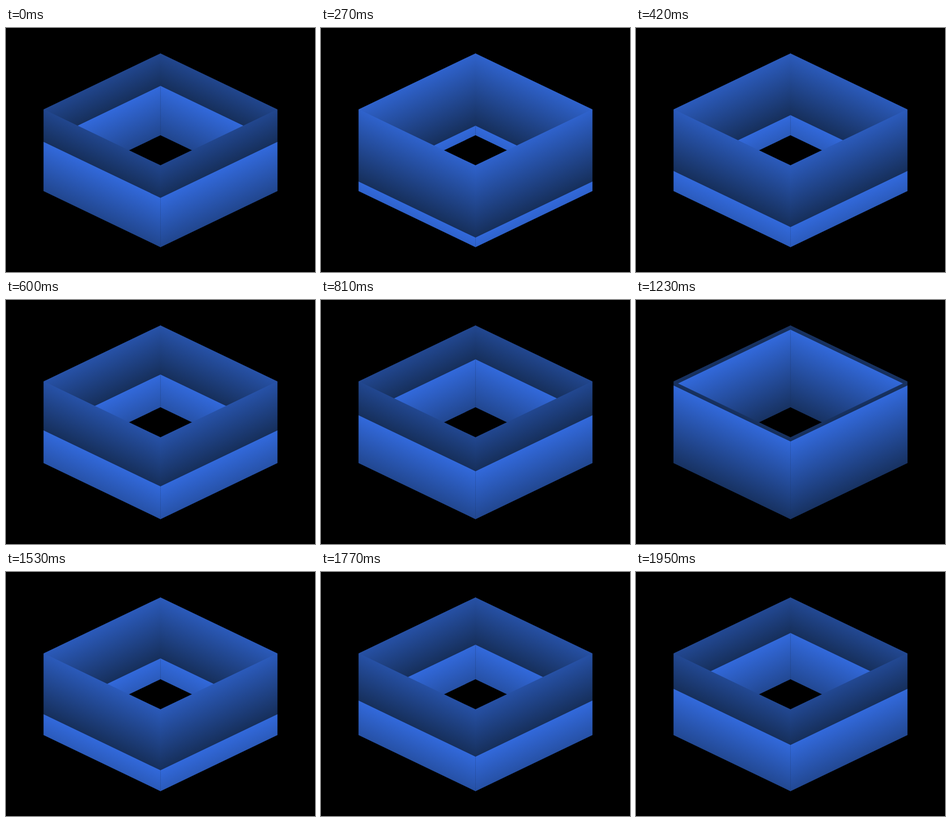
Animation, 545 px wide and 432 px high, one loop 1980 ms. Source, as an HTML page:

```html
<!DOCTYPE html>
<html lang="en">
<head>
<meta charset="utf-8">
<title>Isometric gradient box</title>
<style>
  html, body { margin: 0; width: 100%; height: 100%; overflow: hidden; background: #000; }
  svg { display: block; width: 545px; height: 432px; }
</style>
</head>
<body>
<svg viewBox="0 0 545 432">
  <defs>
    <linearGradient id="above" gradientUnits="userSpaceOnUse" x1="0" x2="0">
      <stop offset="0" stop-color="#3269db"/><stop offset="1" stop-color="#162f5b"/>
    </linearGradient>
    <linearGradient id="below" gradientUnits="userSpaceOnUse" x1="0" x2="0">
      <stop offset="0" stop-color="#3269db"/><stop offset="1" stop-color="#162f5b"/>
    </linearGradient>
  </defs>
  <g id="walls"></g>
</svg>
<script>
const LOOP = 1980, STEP = 30;
const HEIGHT = 144.8, WIDTH = 206, RISE = 99.1;
const LEFT = 66.5, MIDDLE = 272.5, TOP = 44.9;

// [time, position of the seam below the rim]; the seam wraps at the wall height
const KEYS = [
  [0, 57.7], [90, 57.7], [120, 1.5], [270, -16.8], [600, -57.8], [630, -62.4],
  [660, -62.4], [990, -111.3], [1020, -111.3], [1200, -130], [1230, -137.3],
  [1530, -181.6], [1560, -181.6], [1950, -226.5], [1980, -231.9]
];

const walls = document.getElementById("walls");
const above = document.getElementById("above");
const below = document.getElementById("below");
const lowerRects = [];

function set(el, attrs) {
  for (const name in attrs) el.setAttribute(name, attrs[name]);
  return el;
}

function addRect(parent, attrs) {
  const rect = document.createElementNS("http://www.w3.org/2000/svg", "rect");
  return parent.appendChild(set(rect, attrs));
}

function addWall(x, y, rise, overlap) {
  const group = document.createElementNS("http://www.w3.org/2000/svg", "g");
  set(group, { transform: `matrix(1 ${rise / WIDTH} 0 1 ${x} ${y})` });
  const width = WIDTH + overlap;
  addRect(group, { width, height: HEIGHT, fill: "url(#above)" });
  lowerRects.push(addRect(group, { width, fill: "url(#below)" }));
  walls.appendChild(group);
}

addWall(LEFT, TOP + RISE, -RISE, 0.5);
addWall(MIDDLE, TOP, RISE, 0);
addWall(LEFT, TOP + RISE, RISE, 0.5);
addWall(MIDDLE, TOP + 2 * RISE, -RISE, 0);

function seamAt(time) {
  const i = KEYS.findIndex(key => key[0] > time);
  const [t0, p0] = KEYS[i - 1], [t1, p1] = KEYS[i];
  const pos = p0 + (p1 - p0) * (time - t0) / (t1 - t0);
  return ((pos % HEIGHT) + HEIGHT) % HEIGHT;
}

function draw(time) {
  const seam = seamAt(Math.floor((time % LOOP) / STEP) * STEP);
  set(above, { y1: seam - HEIGHT, y2: seam });
  set(below, { y1: seam, y2: seam + HEIGHT });
  for (const rect of lowerRects) set(rect, { y: seam, height: HEIGHT - seam });
}

const start = performance.now();
function tick() {
  draw(performance.now() - start);
  requestAnimationFrame(tick);
}
tick();
</script>
</body>
</html>
```
